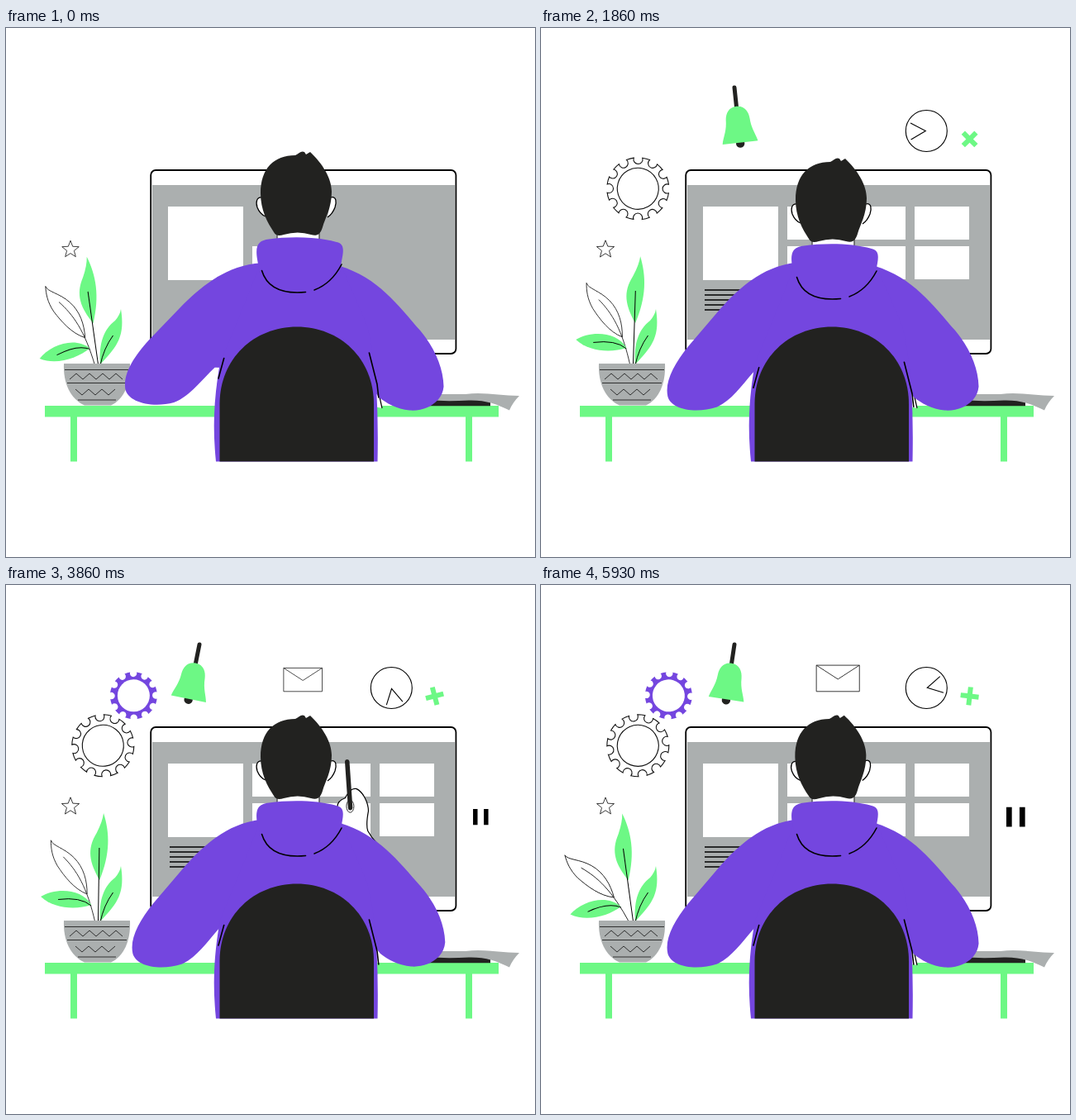
These frames come from a looping animation (640 by 640 pixels, 6 s). An HTML page:

```html
<!DOCTYPE html>
<html lang="en">
<head>
<meta charset="utf-8">
<title>Working at a desk</title>
<style>
html, body { margin: 0; width: 100%; height: 100%; overflow: hidden; background: #fff; }
svg { display: block; width: 100vw; height: 100vh; }
.green { fill: #6df885; }
.gray { fill: #abafaf; }
.purple { fill: #7446df; }
.dark { fill: #222220; }
.white { fill: #fff; }
.line { fill: none; stroke: #000; stroke-width: 1.6; stroke-linecap: round; }
.thin { fill: none; stroke: #222; stroke-width: .9; stroke-linejoin: round; }
.rib { fill: none; stroke: #000; }
</style>
</head>
<body>
<svg viewBox="0 0 640 640">
  <!-- monitor -->
  <rect x="175.2" y="172" width="369.2" height="222" rx="6" fill="#fff" stroke="#000" stroke-width="1.8"/>
  <rect class="gray" x="177" y="190" width="366" height="187"/>
  <rect class="white" x="196" y="216" width="91" height="89"/>
  <g id="tiles" class="white"></g>
  <path id="text" fill="none" stroke="#000" stroke-width="1.7"/>

  <!-- floating icons -->
  <path id="star" class="thin"/>
  <g id="cog" fill="none" stroke="#111" stroke-width="1.1"><path id="cogEdge"/><circle r="25"/></g>
  <g id="wheel"><path class="purple" id="wheelEdge"/><circle class="white" r="19.5"/></g>
  <g id="bell">
    <path d="M0 0V26" fill="none" stroke="#222220" stroke-width="5" stroke-linecap="round"/>
    <circle class="dark" cy="68" r="5.2"/>
    <path class="green" d="M0 23C-10 23-14 31-14.5 39C-15 52-20 59-21.5 67H21.5C20 59 15 52 14.5 39C14 31 10 23 0 23Z"/>
  </g>
  <path id="mail" class="thin" d="M-26.3-32H26.3V0H-26.3ZL0-15L26.3-32"/>
  <g id="clock" fill="none" stroke="#000" stroke-width="1.1">
    <circle r="25"/><path id="hands" d="M19-10L1 0L19 10"/>
  </g>
  <path id="plus" class="green" d="M-3-11H3V-3H11V3H3V11H-3V3H-11V-3H-3Z"/>
  <path id="pause" d="M-11-11.5h6.5v23h-6.5ZM4.5-11.5h6.5v23h-6.5Z"/>

  <!-- desk -->
  <path class="green" d="M47 457H596V470.5H564V524.5H556V470.5H86V524.5H78V470.5H47Z"/>
  <path class="dark" d="M488 449H586V457.3H488Z"/>
  <path class="gray" d="M512 443H556C578 440 598 445 621 445Q613 453 609 462.5C594 455 580 450 560 450.5Q530 452 512 450Z"/>

  <!-- plant -->
  <g id="sprig">
    <path class="thin" d="M54 309C56 316 70 318 82 330C94 342 98 358 98 374C82 368 70 352 62 340C55 328 54 318 54 309ZM69 329C85 345 98 365 108 409"/>
    <g id="low">
      <path class="green" d="M42 377C60 366 92 367 103 387C85 393 58 392 42 377Z"/>
      <path class="rib" d="M63 380.5Q90 377 103 388"/>
    </g>
  </g>
  <g id="tall">
    <path class="green" d="M116 276C124 300 125 325 112.5 357C100 336 96 320 108 300Q115 286 116 276Z"/>
    <path class="rib" d="M111.5 318V409"/>
  </g>
  <g id="side">
    <path class="green" d="M139 340C144 372 136 384 114 407C112 380 119 364 132 354Q138 347 139 340Z"/>
    <path class="rib" d="M129.5 372Q118 388 114 408"/>
  </g>
  <path class="gray" d="M70 406H150C151 430 143 449 127 456.5H95C78 449 69 430 70 406Z"/>
  <path id="pattern" class="thin"/>

  <!-- hand with pen -->
  <g id="hand">
    <path fill="#fff" stroke="#000" stroke-width="1.2" d="M408 330L402 272C400 264 405 260 411 258C416 248 421 246 425 247C433 251 439 264 439 274C437 284 436 292 438 298Q442 306 449 313L455 340"/>
    <path d="M414 214L417.2 270" stroke="#222220" stroke-width="5.5" stroke-linecap="round"/>
    <ellipse class="thin" cx="417" cy="268" rx="4.5" ry="7.5"/>
  </g>

  <!-- person -->
  <path id="armL" class="purple" d="M308 283.5C270 289 243 312 218 341L180 387C163 409 152 430 156 448C160 464 190 469 216 460C235 451 248 429 262 414L340 410V284Z"/>
  <path id="armR" class="purple" d="M404 288C450 303 473 336 500 368C516 388 527 412 527 436C525 455 505 466 485 464C470 462 457 455 448 447L421 409L390 300Z"/>
  <path class="purple" d="M308 283.5H404L437 360C447 400 451 450 449.5 524.5H254C250 485 251 450 259 405L290 330Z"/>
  <path id="folds" class="line" d="M263.7 411.5L257 436M439.4 405L449 443L450.8 459"/>
  <path class="dark" d="M258.5 524.5V455C258.5 400 300 361.5 352 361.5S445 400 445 455V524.5Z"/>
  <g id="head">
    <path class="white" d="M327.5 245H379.5V268H327.5Z"/>
    <path class="rib" d="M328 250V264M379 250V264"/>
    <g id="skull">
      <path fill="#fff" stroke="#000" stroke-width="1.3" d="M310 213C303 212 302 219 304 225Q307 233 314 236M393 213C400 211 400 219 398 225Q395 233 389 237"/>
      <path class="dark" d="M308 208C308 178 324 162 350 162C354 160 357 156 361 158L363 161L368 158C383 172 394 190 394 206C394 226 386 238 383 249C380 259 375 260 369 258Q353 253 336 258C330 260 326 259 324 255C316 243 308 228 308 208Z"/>
    </g>
    <path class="purple" d="M304 288C301 270 306 265 318 263.5C342 260 376 260 400 267C409 269 409 276 406 290C404 310 384 325 360 329C330 330 308 316 304 288Z"/>
    <path class="line" d="M309.5 301.5C316 323 336 330 362.5 327.5M373 325Q394 317 406 294"/>
  </g>
</svg>
<script>
const LOOP = 6000, FPS = 14;
const $ = id => document.getElementById(id);
const put = (id, value) => $(id).setAttribute('transform', value);
const path = (id, d) => $(id).setAttribute('d', d);
const turn = (id, angle, x, y) => put(id, `rotate(${angle} ${x} ${y})`);
const place = (id, x, y, size, angle = 0) =>
  put(id, `translate(${x} ${y}) rotate(${angle}) scale(${size})`);
const range = n => [...Array(n).keys()];
const polar = (r, deg) => {
  const a = deg * Math.PI / 180;
  return `${(r * Math.cos(a)).toFixed(2)} ${(r * Math.sin(a)).toFixed(2)}`;
};

// Motion: a smooth step, a sine with a given peak, a single soft bump
const ease = (t, start, span = 250) => {
  const u = Math.min(1, Math.max(0, (t - start) / span));
  return u * u * (3 - 2 * u);
};
const wave = (t, peak, period) => Math.cos((t - peak) / period * 2 * Math.PI);
const bump = (t, peak, width) => Math.exp(-(((t - peak) / width) ** 2));

// Twelve teeth with round notches between them
function gear(r) {
  const notch = r * Math.sin(8 * Math.PI / 180) * 1.06;
  return 'M' + polar(r, -7) + range(12).map(i =>
    `A${r} ${r} 0 0 1 ${polar(r, i * 30 + 7)}A${notch} ${notch} 0 1 0 ${polar(r, i * 30 + 23)}`).join('') + 'Z';
}
const zigzag = (x, y, steps, rise) =>
  `M${x} ${y}` + range(steps).map(i => `l8 ${i % 2 ? -rise : rise}`).join('');

path('cogEdge', gear(37.5));
path('wheelEdge', gear(28.5));
path('star', 'M' + range(10).map(i => polar(i % 2 ? 4.8 : 11.2, i * 36 - 90)).join('L') + 'Z');
path('pattern', 'M71 413.5H149M74 429.5H146M87 450H133' + zigzag(77, 425, 8, -7) + zigzag(84, 437, 6, 7));
$('tiles').innerHTML = range(6).map(i => `<path id="tile${i}" d="M-33-20H33V20H-33Z"/>`).join('');

function drawScreen(t) {
  for (const i of range(6))
    place('tile' + i, 331 + 77 * (i >> 1), 284 - 48 * (i % 2), i ? ease(t, 30 + i * 80) : 1);
  path('text', range(5).map(i => `M198 ${317 + i * 6}h${80 * ease(t, 300 + i * 90, 300)}`).join(''));
}

function drawIcons(t) {
  place('star', 78, 268, .75 + .25 * wave(t, 3820, 2000));
  place('clock', 466.3, 124.5, ease(t, 330));
  turn('hands', .13 * t - 63, 0, 0);
  place('bell', 234, 72, ease(t, 880), 13 * wave(t, 3640, 2650));
  place('plus', 518.6, 134.4, ease(t, 950), -.12 * t - 92);
  place('cog', 117.3, 194.3, ease(t, 1500), t * .0567);
  place('wheel', 154.4, 133.8, ease(t, 1960), (4640 - t) * .0567);
  place('mail', 359.2, 128.8, ease(t, 2150) * (.94 + .065 * wave(t, 2900, 1600)));
  place('pause', 574.3, 280.6, ease(t, 2250) * (1 + .16 * wave(t, 3080, 1600)));
}

function drawPlant(t) {
  const sway = wave(t, 0, 2900);
  const stem = -1 - 2.5 * sway - 12 * ease(t, 5000, 1000);
  const droop = 21 * ease(t, 0, 1200) - 18 * ease(t, 3900, 750) - 21;
  turn('sprig', stem, 108, 412);
  turn('low', droop - stem, 103, 388);
  turn('tall', -2 - 6 * sway, 111.5, 407);
  turn('side', 18 * Math.max(0, wave(t, 2750, 1900)), 113, 411);
}

function drawPerson(t) {
  const write = bump(t, 4640, 450);
  const hidden = 1 - ease(t, 3250, 600) + ease(t, 4800, 650);
  turn('armL', 4.4 - 3.4 * ease(t, 0, 1400), 300, 290);
  turn('armR', -1 + 8 * bump(t, 2600, 230) - 14.5 * write, 405, 290);
  put('hand', `translate(${-12 * write} ${120 * hidden - 8 * write}) rotate(${-14 * write} 425 270)`);
  put('folds', `translate(0 ${-12 + 12 * ease(t, 0, 2200)})`);
  put('head', `translate(0 ${-8 + 8 * ease(t, 0, 700)})`);
  turn('skull', -.7 * ease(t, 5000, 900), 353, 260);
}

function tick() {
  const frame = Math.floor((performance.now() % LOOP + 5) * FPS / 1000) % (LOOP * FPS / 1000);
  const t = frame * 1000 / FPS;
  drawScreen(t);
  drawIcons(t);
  drawPlant(t);
  drawPerson(t);
  requestAnimationFrame(tick);
}
tick();
</script>
</body>
</html>
```
